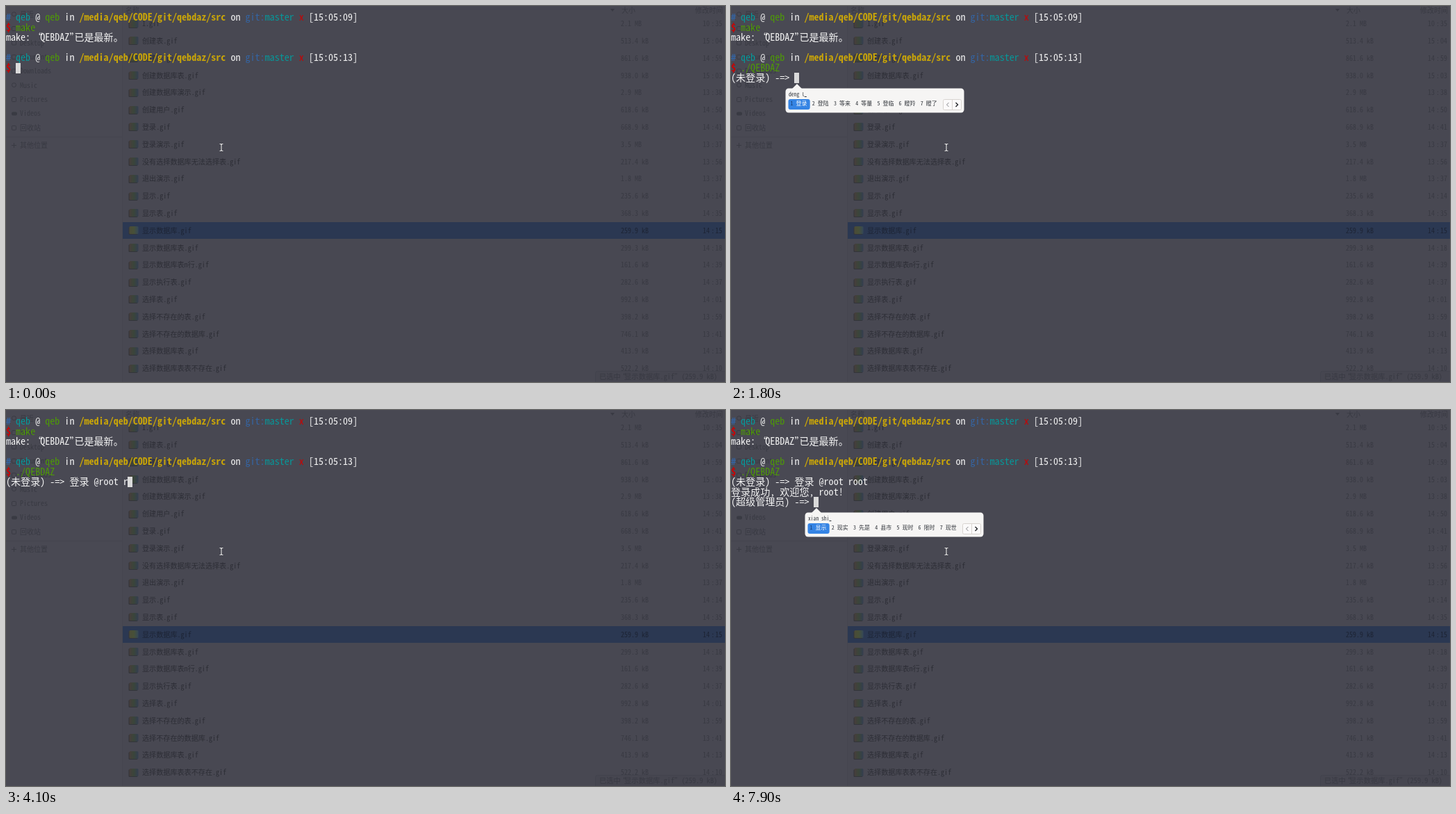
Animation, 1035 px wide and 541 px high, one loop 8000 ms. Source, as an HTML page with a canvas:

```html
<!DOCTYPE html>
<html lang="zh-CN">
<head>
<meta charset="utf-8">
<title>Terminal login</title>
<style>
  html, body { margin: 0; width: 100%; height: 100%; overflow: hidden; background: #484852; }
  canvas { display: block; width: 1035px; height: 541px; }
</style>
</head>
<body>
<canvas id="stage" width="1035" height="541"></canvas>
<script>
const ctx = document.getElementById('stage').getContext('2d');
const LOOP = 8000;
const CELL = 7.03;
const USER = 'qeb', APP = 'QEBDAZ';
const LATIN = '"Noto Sans Mono CJK SC", "Noto Sans Mono", monospace';
const HAN = '"Noto Sans Mono CJK SC", "Noto Sans CJK SC", "Noto Sans CJK", sans-serif';
const C = {
  bg: '#484852', side: '#494953', name: '#2d2e36', dim: '#393a43', sel: '#2b3852',
  white: '#f4f4f4', blue: '#3465a4', cyan: '#06989a', green: '#4e9a06',
  gold: '#c9a508', red: '#cc0000', ghost: '#65666b', cursor: '#dadada'
};

// time, prompt, typed text, pinyin, candidates
const STEPS = [
  [0, 'shell', ''],
  [200, 'shell', '.'],
  [400, 'shell', './'],
  [700, 'shell', './' + APP],
  [900, 'guest', ''],
  [1400, 'guest', '', 'd', '的 到 都 大 地 对 多'],
  [1500, 'guest', '', 'de', '的 得 德 地 嘚 锝 底'],
  [1600, 'guest', '', 'den', '等 登 灯 扽 瞪 邓 凳'],
  [1700, 'guest', '', 'deng', '等 登 灯 瞪 邓 凳 蹬'],
  [1800, 'guest', '', 'deng l', '登录 登陆 等来 等量 登临 瞪羚 瞪了'],
  [2000, 'guest', '登录'],
  [2100, 'guest', '登录 '],
  [3100, 'guest', '登录 @roo'],
  [3200, 'guest', '登录 @root'],
  [3400, 'guest', '登录 @root '],
  [3500, 'guest', '登录 @root rt'],
  [3600, 'guest', '登录 @root rto'],
  [4000, 'guest', '登录 @root rt'],
  [4100, 'guest', '登录 @root r'],
  [4300, 'guest', '登录 @root ro'],
  [4500, 'guest', '登录 @root roo'],
  [4900, 'guest', '登录 @root root'],
  [5200, 'admin', ''],
  [7400, 'admin', '', 'x', '下 写 系 先 新 小 想'],
  [7500, 'admin', '', 'xi', '系 西 洗 喜 细 息 希'],
  [7600, 'admin', '', 'xia', '下 夏 吓 虾 瞎 霞 峡'],
  [7700, 'admin', '', 'xian', '先 线 现 县 显 限 闲'],
  [7800, 'admin', '', 'xian s', '显示 现实 先是 先生 线上 现时 限时'],
  [7900, 'admin', '', 'xian shi', '显示 现实 先是 县市 现时 限时 现世']
];

const FILES = `1|2.1 MB|10:35
创建表|513.4 kB|15:04
创建库|861.6 kB|14:59
创建数据库表|938.0 kB|15:03
创建数据库演示|2.9 MB|13:38
创建用户|618.6 kB|14:50
登录|668.9 kB|14:41
登录演示|3.5 MB|13:37
没有选择数据库无法选择表|217.4 kB|13:56
退出演示|1.8 MB|13:37
显示|235.6 kB|14:14
显示表|368.3 kB|14:35
显示数据库|259.9 kB|14:15
显示数据库表|299.3 kB|14:18
显示数据库表n行|161.6 kB|14:39
显示执行表|282.6 kB|14:37
选择表|992.8 kB|14:01
选择不存在的表|398.2 kB|13:59
选择不存在的数据库|746.1 kB|13:41
选择数据库表|413.9 kB|14:13
选择数据库表表不存在|522.2 kB|14:10`.split('\n').map(line => line.split('|'));

ctx.font = '100px ' + LATIN;
const ratio = ctx.measureText('0').width / 100;

// Writes text on a character grid; returns the x after the last cell.
function put(text, x, y, color, cell = CELL, bold = false) {
  ctx.fillStyle = color;
  for (const ch of text) {
    const wide = ch.charCodeAt(0) > 255;
    ctx.font = wide ? `300 ${cell * 2}px ${HAN}`
      : `${bold ? 'bold' : 'normal'} ${cell / ratio}px ${LATIN}`;
    ctx.fillText(ch, ch === '“' ? x - cell / 2 : x, y);
    x += wide && !'“”'.includes(ch) ? cell * 2 : cell;
  }
  return x;
}

function box(x, y, w, h, r, fill, stroke) {
  ctx.beginPath();
  ctx.roundRect(x, y, w, h, r);
  if (fill) { ctx.fillStyle = fill; ctx.fill(); }
  if (stroke) { ctx.strokeStyle = stroke; ctx.lineWidth = 1; ctx.stroke(); }
}

function path(points, color, width = 1) {
  ctx.beginPath();
  points.forEach(([x, y]) => ctx.lineTo(x, y));
  ctx.strokeStyle = color;
  ctx.lineWidth = width;
  ctx.stroke();
}

function drawSidebar() {
  ctx.fillStyle = C.side;
  ctx.fillRect(0, 0, 167, 541);
  ctx.fillStyle = '#45454f';
  ctx.fillRect(167, 0, 1, 541);
  ctx.fillRect(0, 188, 167, 1);
  const names = ['最近', 'Home', 'Desktop', 'Documents', 'Downloads', 'Music', 'Pictures', 'Videos', '回收站'];
  names.forEach((name, i) => {
    const y = 12.2 + 20.4 * i;
    put(name, 20, Math.round(y + 3.5), C.dim, 5);
    if (i === 0 || i === 5) box(8.5, y - 3.5, 6, 6, 3, null, C.dim);
    else if (i === 7) box(8, y - 2.5, 8, 5, 2, C.dim);
    else box(8.5, y - 3, 6, 6, 1, null, C.dim);
  });
  path([[8, 200.5], [15, 200.5]], C.dim);
  path([[11.5, 197], [11.5, 204]], C.dim);
  put('其他位置', 20, 204, C.dim, 5);
}

function drawIcon(y, selected) {
  const g = ctx.createLinearGradient(177, 0, 191, 0);
  g.addColorStop(0, selected ? '#4b4a38' : '#483d3c');
  g.addColorStop(.5, selected ? '#475038' : '#3a453a');
  g.addColorStop(1, selected ? '#33475a' : '#333d52');
  box(176.5, y - 5, 13, 11, 1.5, '#33353b');
  box(177.5, y - 6, 13, 11, 1.5, g);
}

function drawFiles() {
  put('名称', 172, 10, C.dim, 5);
  put('大小', 886, 10, C.dim, 5);
  put('修改时间', 992, 10, C.dim, 5);
  ctx.fillStyle = C.dim;
  ctx.beginPath();
  ctx.moveTo(870, 4); ctx.lineTo(876, 4); ctx.lineTo(873, 8);
  ctx.fill();
  ctx.fillStyle = C.sel;
  ctx.fillRect(168, 311, 867, 24);
  FILES.forEach(([name, size, time], i) => {
    const y = 25.6 + 24.8 * i, base = Math.round(y + 3.5);
    const selected = i === 12;
    const color = selected ? '#1d2434' : C.dim;
    const [hour, minute] = time.split(':');
    drawIcon(Math.round(y), selected);
    put(name + '.gif', 196, base, selected ? color : C.name, 5.05);
    put(size, 885, base, color, 5);
    put(hour, 1003, base, color, 5);
    put(':', 1015, base, color, 5);
    put(minute, 1021, base, color, 5);
  });
  box(848.5, 525.5, 190, 20, 3, '#464650', '#42434d');
  put('已选中“显示数据库.gif” (259.9 kB)', 854, 537, C.dim, 5.15);
}

function drawPointer() {
  const shape = [[[307.5, 198.5], [309, 198.5], [310, 199.5], [311, 198.5], [312.5, 198.5]],
    [[310, 199], [310, 208]],
    [[307.5, 208.5], [309, 208.5], [310, 207.5], [311, 208.5], [312.5, 208.5]]];
  shape.forEach(p => path(p, '#3a3b43', 2.2));
  shape.forEach(p => path(p, '#e2e2e2', 1.2));
}

const rowTop = row => Math.floor(9.5 + 14.5 * row);
const line = (text, row, color = C.white, x = 0, bold = false) =>
  put(text, x, rowTop(row) + 12, color, CELL, bold);

function drawPrompt(row, clock) {
  let x = 0;
  [['# ', C.blue, true], [USER, C.cyan], [' @ ', C.white], [USER, C.green], [' in ', C.white],
    [`/media/${USER}/CODE/git/${APP.toLowerCase()}/src`, C.gold, true], [' on ', C.white],
    ['git:', C.blue], ['master', C.cyan], [' x ', C.red], [`[${clock}]`, C.white]
  ].forEach(([text, color, bold]) => { x = line(text, row, color, x, bold); });
  line('$', row + 1, C.red, 0, true);
}

function drawCursor(x, row) {
  ctx.fillStyle = C.cursor;
  ctx.fillRect(Math.floor(x), rowTop(row), 7, 15);
}

function drawPopup(cursorX, row, pinyin, list) {
  const words = list.split(' ');
  const x = Math.floor(cursorX) - 13, y = rowTop(row) + 22;
  const step = 15.2 + 8 * words[0].length;
  const nav = Math.round(x + 4 + step * words.length + 4.5);
  const paper = '#f6f5f4', ink = '#30343a';
  box(x + .5, y + .5, nav + 30 - x, 35, 4.5, paper);
  ctx.fillStyle = paper;
  ctx.beginPath();
  ctx.moveTo(x + 10, y + 1);
  ctx.lineTo(x + 17, y - 6);
  ctx.lineTo(x + 24, y + 1);
  ctx.fill();
  const end = put(pinyin, x + 5, y + 12, ink, 3.8);
  ctx.fillStyle = ink;
  ctx.fillRect(end, y + 12, 3, 1);
  box(x + 4.5, y + 16, step, 15, 3, '#3584e4');
  words.forEach((word, i) => {
    const wx = x + 7.6 + step * i;
    put(String(i + 1), wx, y + 25, i ? ink : '#173d70', 4);
    put(word, wx + 8, y + 25, i ? ink : '#ffffff', 4);
  });
  box(nav + .5, y + 16.5, 26, 15, 2, '#fbfafa', '#d8d4d0');
  path([[nav + 13.5, y + 16.5], [nav + 13.5, y + 31.5]], '#d8d4d0');
  path([[nav + 8.5, y + 21], [nav + 5.5, y + 24], [nav + 8.5, y + 27]], '#85868a');
  path([[nav + 18.5, y + 21], [nav + 21.5, y + 24], [nav + 18.5, y + 27]], '#222428', 1.4);
}

function drawShell(text) {
  const left = 2 * CELL, x = left + CELL * text.length;
  if (text.length === 1 || text.length === 2) line('./a.out'.slice(text.length), 5, C.ghost, x);
  line(text, 5, text === './' ? C.white : C.green, left);
  if (text === './') path([[left, 95.5], [x, 95.5]], C.white);
  drawCursor(x, 5);
}

function draw([, mode, text, pinyin, list]) {
  ctx.fillStyle = C.bg;
  ctx.fillRect(0, 0, 1035, 541);
  drawSidebar();
  drawFiles();
  drawPrompt(0, '15:05:09');
  line('make', 1, C.green, 2 * CELL);
  line(`make: “${APP}”已是最新。`, 2);
  drawPrompt(4, '15:05:13');
  if (mode === 'shell') drawShell(text);
  else {
    const admin = mode === 'admin', row = admin ? 8 : 6;
    line('./' + APP, 5, C.green, 2 * CELL);
    if (admin) {
      line('(未登录) -=> 登录 @root root', 6);
      line('登录成功, 欢迎您, root!', 7);
    }
    const x = line((admin ? '(超级管理员) -=> ' : '(未登录) -=> ') + text, row);
    drawCursor(x, row);
    if (pinyin) drawPopup(x, row, pinyin, list);
  }
  drawPointer();
}

let shown = null;
const start = performance.now();
function tick() {
  const t = (performance.now() - start) % LOOP;
  const step = STEPS.findLast(s => s[0] <= t);
  if (step !== shown) draw(shown = step);
  requestAnimationFrame(tick);
}
tick();
</script>
</body>
</html>
```
